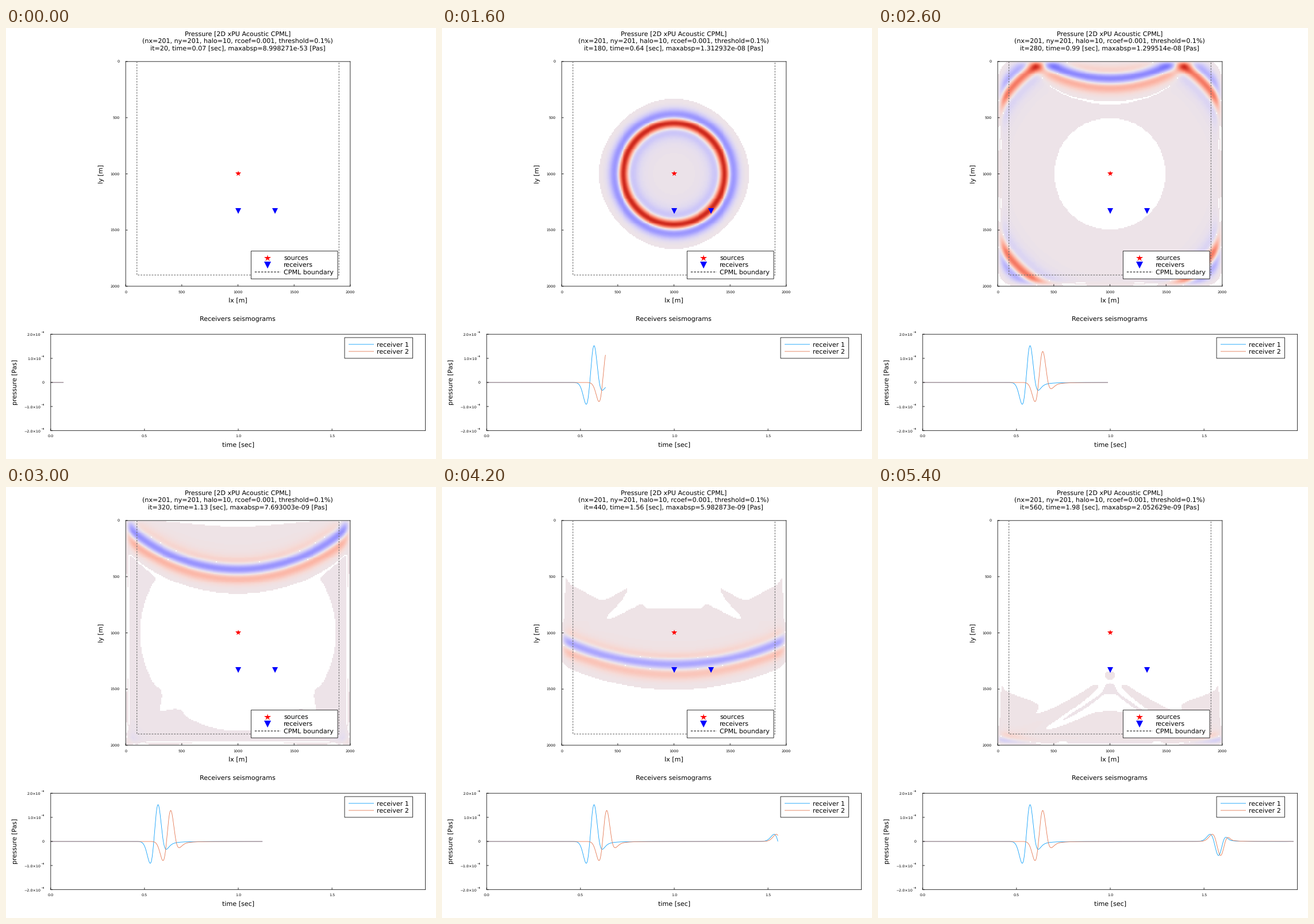
Recreate the animation shown at these times as a matplotlib script. Size 748 by 749 pixels, loop 5.6 s.

```python
import numpy as np
import matplotlib.pyplot as plt
from matplotlib.animation import FuncAnimation
from matplotlib.colors import LinearSegmentedColormap
from matplotlib.patches import Rectangle

W, H, DPI = 748, 749, 100
PX = 72 / DPI                      # points per pixel
N, HALO, RCOEF, THRESHOLD = 201, 10, 0.001, 0.001
DX, VEL, F0 = 10.0, 2000.0, 10.0
T0 = 4 / F0
DT = DX / VEL / np.sqrt(2)
NT, EVERY, SHOTS = 566, 20, 28
PLIM = 2e-8
SRC, REC = N // 2, 133


# ---------- wave simulation ----------
def ricker(t):
    q = (np.pi * F0 * (t - T0)) ** 2
    return (1 - 2 * q) * np.exp(-q)


def damping(to_edge):
    """CPML coefficients for points a number of cells away from the edge."""
    depth = np.clip((HALO - to_edge) / HALO, 0, 1)
    d = -3 * VEL * np.log(RCOEF) / (2 * HALO * DX) * depth ** 2
    alpha = np.pi * F0 * (1 - depth)
    b = np.exp(-(d + alpha) * DT)
    return d * (b - 1) / (d + alpha), b


def simulate():
    node, mid = np.arange(1, N - 1), np.arange(N - 1) + 0.5
    ax, bx = damping(np.minimum(node, N - 1 - node))
    axh, bxh = damping(np.minimum(mid, N - 1 - mid))
    # the top is a free surface, so only the bottom absorbs in y
    ay, by = (v[:, None] for v in damping(N - 1 - node))
    ayh, byh = (v[:, None] for v in damping(N - 1 - mid))

    old, cur = np.zeros((N, N)), np.zeros((N, N))
    psx, psy = np.zeros((N - 2, N - 1)), np.zeros((N - 1, N - 2))
    xix, xiy = np.zeros((N - 2, N - 2)), np.zeros((N - 2, N - 2))
    shots, traces = [], np.zeros((2, EVERY * SHOTS))
    for it in range(1, EVERY * SHOTS + 1):
        gx = np.diff(cur[1:-1], axis=1) / DX
        gy = np.diff(cur[:, 1:-1], axis=0) / DX
        psx = bxh * psx + axh * gx
        psy = byh * psy + ayh * gy
        sx = np.diff(gx + psx, axis=1) / DX
        sy = np.diff(gy + psy, axis=0) / DX
        xix = bx * xix + ax * sx
        xiy = by * xiy + ay * sy
        new = np.zeros((N, N))
        new[1:-1, 1:-1] = (2 * cur - old)[1:-1, 1:-1] \
            + (VEL * DT) ** 2 * (sx + sy + xix + xiy)
        new[SRC, SRC] += DT ** 2 * ricker((it - 1) * DT) / DX ** 2
        old, cur = cur, new
        traces[:, it - 1] = cur[REC, SRC], cur[REC, REC]
        if it % EVERY == 0:
            shots.append(cur)
    return shots, traces


shots, traces = simulate()
times = np.arange(EVERY * SHOTS) * DT

# ---------- colours ----------
STOPS = [(-1, 0, 20, 150), (-.85, 30, 34, 222), (-.66, 88, 84, 247),
         (-.45, 136, 131, 254), (-.33, 163, 158, 255), (-.18, 199, 193, 251),
         (-.06, 225, 218, 241), (0, 238, 228, 232), (.06, 246, 219, 215),
         (.18, 252, 190, 176), (.33, 251, 147, 126), (.45, 242, 110, 88),
         (.656, 206, 40, 28), (.8, 168, 0, 5), (1, 105, 0, 0)]
cmap = LinearSegmentedColormap.from_list(
    "bwr", [((u + 1) / 2, (r / 255, g / 255, b / 255)) for u, r, g, b in STOPS],
    N=256)
cmap.set_bad("white")
BLUE, ORANGE, GRAY = "#009afa", "#e36f47", "#6a6a6a"

# ---------- stage ----------
plt.rcParams.update({"font.family": "DejaVu Sans", "text.hinting": "none",
                     "path.snap": False})
fig = plt.figure(figsize=(W / DPI, H / DPI), dpi=DPI, facecolor="white")


def panel(x0, y0, x1, y1, xlim, ylim):
    """Axes whose corners are given as pixel centres."""
    ax = fig.add_axes([(x0 + 0.5) / W, 1 - (y1 + 0.5) / H,
                       (x1 - x0) / W, (y1 - y0) / H])
    ax.set(xlim=xlim, ylim=ylim, xticks=[], yticks=[])
    for s in ax.spines.values():
        s.set_linewidth(0.8 * PX)
    return ax


top = panel(207.7, 57.7, 598.3, 448.3, (0, 2000), (2000, 0))
low = panel(77.3, 531.7, 729, 699.2, (0, (NT - 1) * DT), (-PLIM, PLIM))

# overlay in pixel coordinates
over = fig.add_axes([0, 0, 1, 1], zorder=5)
over.set(xlim=(-0.5, W - 0.5), ylim=(H - 0.5, -0.5))
over.axis("off")
BIG, SMALL = 11.11, 6.35


def text(x, y, s, size=BIG, ha="center", va="baseline", **kw):
    return over.text(x, y, s, fontsize=size * PX, ha=ha, va=va, **kw)


def line(xs, ys, color="black", lw=0.8, **kw):
    over.plot(xs, ys, color=color, lw=lw * PX, solid_capstyle="butt", **kw)


def star(ax, x, y, size):
    ax.plot(x, y, "*", color="red", ms=size * PX, mew=0, zorder=4)


def receiver(ax, x, y, size):
    ax.plot(x, y, "v", color="blue", ms=size * PX, mew=0, zorder=4)


def box(x0, y0, x1, y1):
    over.add_patch(Rectangle((x0, y0), x1 - x0, y1 - y0, fc="white",
                             ec="black", lw=0.8 * PX))


# pressure map
field = top.imshow(np.ma.masked_all((N, N)), cmap=cmap, vmin=-PLIM, vmax=PLIM,
                   extent=(-5, 2005, 2005, -5), aspect="auto",
                   interpolation="nearest")
top.set(xlim=(0, 2000), ylim=(2000, 0))
a, b = HALO * DX, 2000 - HALO * DX
top.plot([a, a, b, b], [0, b, b, 0], color=GRAY, lw=1.1 * PX,
         ls=(0, (2.5, 1.9)), zorder=3)
star(top, SRC * DX, SRC * DX, 10.6)
for x in (SRC, REC):
    receiver(top, x * DX, REC * DX, 10.6)

for v in range(0, 2001, 500):
    x, y = 207.7 + v * 0.1953, 57.7 + v * 0.1953
    line([x, x], [448.3, 444.8])
    line([207.7, 211.2], [y, y])
    text(x, 460.6, str(v), SMALL)
    text(197, y + 2.1, str(v), SMALL, ha="right")
text(402.8, 475.9, "lx [m]")
text(164.8, 253, "ly [m]", va="center", rotation=90)

box(425.8, 387.2, 576.5, 435.5)
star(over, 454.8, 399.1, 13)
receiver(over, 454.8, 411.1, 12.4)
line([432.3, 477.3], [423.5, 423.5], GRAY, 1.8, ls=(0, (1.9, 1.2)))
for k, s in enumerate(("sources", "receivers", "CPML boundary")):
    text(482.7, 402.7 + 12.1 * k, s, ha="left")

# seismograms
text(402.5, 507.9, "Receivers seismograms")
curves = [low.plot([], [], color=c, lw=0.8 * PX)[0] for c in (BLUE, ORANGE)]
for k in range(4):
    x = 77.3 + k * 163.1
    line([x, x], [699.2, 695.7])
    text(x, 710.9, f"{k / 2:.1f}", SMALL)
for k in range(-2, 3):
    y = 615.45 - k * 41.875
    line([77.3, 80.8], [y, y])
    if k == 0:
        text(66.5, y + 2.1, "0", SMALL, ha="right")
        continue
    text(60, y + 2.9, f"{k:.1f}×10".replace("-", "−"), SMALL, ha="right")
    text(60, y - 0.8, "−8", SMALL * 0.7, ha="left")
text(403.2, 726.6, "time [sec]")
text(14.8, 615.4, "pressure [Pas]", va="center", rotation=90)

box(588.5, 537.5, 707, 573.5)
for k, c in enumerate((BLUE, ORANGE)):
    y = 549.3 + 12.2 * k
    line([595.5, 639.5], [y, y], c, 0.8)
    text(645, y + 3.6, f"receiver {k + 1}", ha="left")

text(402.8, 13.5, "Pressure [2D xPU Acoustic CPML]")
text(402.8, 25.7, f"(nx={N}, ny={N}, halo={HALO}, rcoef={RCOEF}, "
                  f"threshold={THRESHOLD * 100:g}%)")
status = text(402.8, 37.8, "")


def draw(k):
    it, p = (k + 1) * EVERY, shots[k]
    field.set_data(np.ma.masked_where(np.abs(p) < THRESHOLD * PLIM, p))
    for curve, trace in zip(curves, traces):
        curve.set_data(times[:it], trace[:it])
    status.set_text(f"it={it}, time={round(float(it * DT), 2)} [sec], "
                    f"maxabsp={np.abs(p).max():e} [Pas]")
    return [field, status, *curves]


anim = FuncAnimation(fig, draw, frames=SHOTS, interval=200, repeat=True,
                     repeat_delay=0, blit=False)
plt.show()
```
